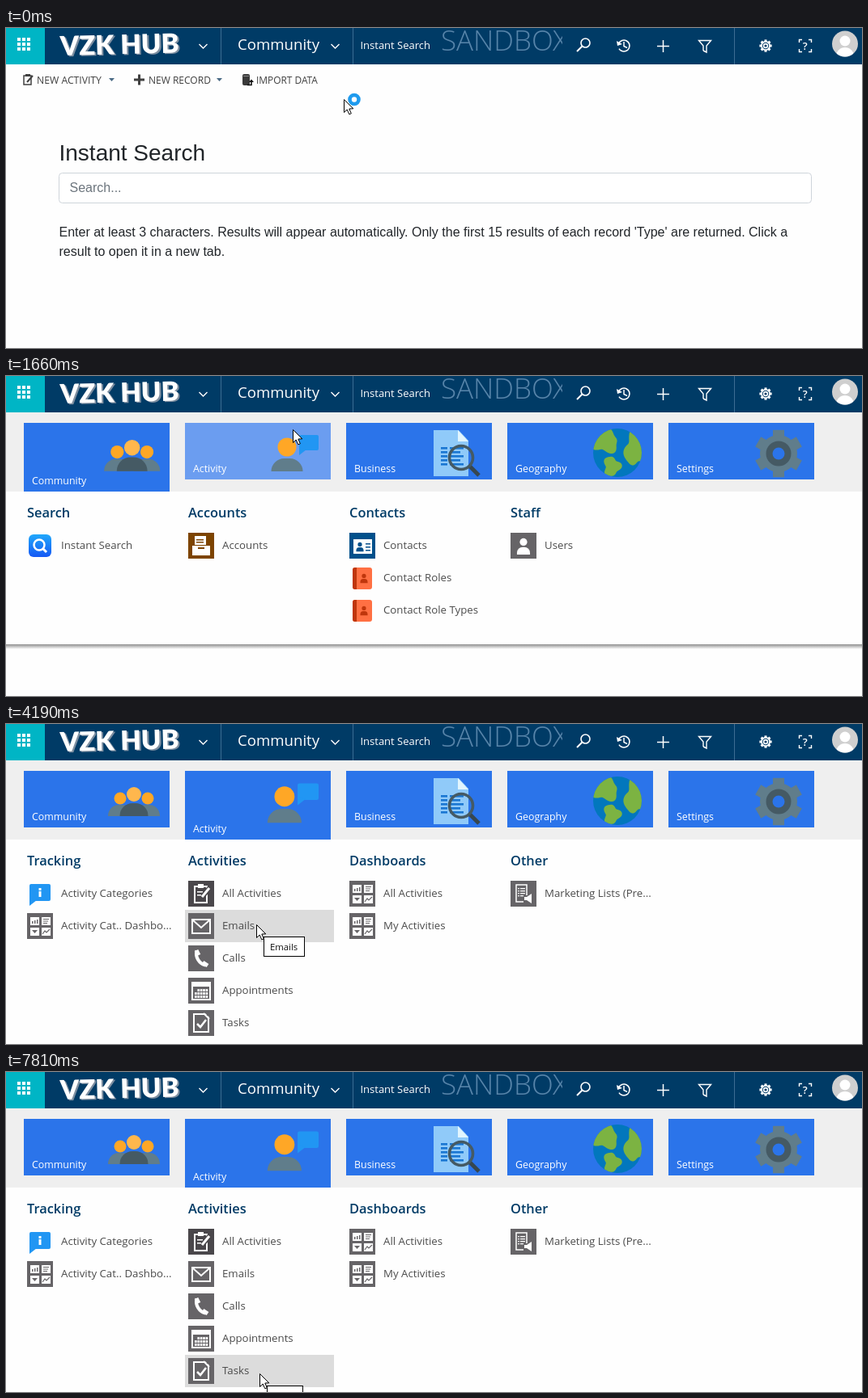
Recreate the animation shown at these times as an HTML page with a canvas. Size 1057x396 px, loop 8.46 s.

```html
<!DOCTYPE html>
<html lang="en">
<head>
<meta charset="utf-8">
<title>Navigation menu</title>
<style>
html, body { margin: 0; width: 100%; height: 100%; overflow: hidden; background: #fefefe; }
canvas { display: block; width: 1057px; height: 396px; }
</style>
</head>
<body>
<canvas id="stage"></canvas>
<script>
const W = 1057, H = 396, LOOP = 8460, TICK = 110;
const COL = 199, ROW = 40, LIST_TOP = 190;
const OPEN = 6, CLICK = 20, DWELL = 4; // in ticks
const NAVY = '#003b66', BLUE = '#2b74ea', GREY = '#666467', PAGE = '#fefefe', INK = '#404040';
const UI = '"Open Sans", "Noto Sans", sans-serif';
const ARIAL = '"Liberation Sans", Arial, sans-serif';
const canvas = document.getElementById('stage');
const dpr = window.devicePixelRatio || 1;
canvas.width = W * dpr;
canvas.height = H * dpr;
const g = canvas.getContext('2d', { alpha: false });

// Drawing helpers
const clamp = v => Math.min(1, Math.max(0, v));
const times = (n, f) => { for (let i = 0; i < n; i++) f(i); };
function rect(c, x, y, w, h) { g.fillStyle = c; g.fillRect(x, y, w, h); }
function frame(c, t, x, y, w, h) { g.strokeStyle = c; g.lineWidth = t; g.strokeRect(x, y, w, h); }
function round(c, x, y, w, h, r) { g.fillStyle = c; g.beginPath(); g.roundRect(x, y, w, h, r); g.fill(); }
function circle(c, x, y, r) { g.fillStyle = c; g.beginPath(); g.arc(x, y, r, 0, 7); g.fill(); }
function arc(c, w, x, y, r, a = 0, b = Math.PI * 2) {
  g.strokeStyle = c; g.lineWidth = w; g.beginPath(); g.arc(x, y, r, a, b); g.stroke();
}
function trace(p) {
  g.beginPath();
  for (let i = 0; i < p.length; i += 2) g.lineTo(p[i], p[i + 1]);
}
function poly(c, ...p) { trace(p); g.fillStyle = c; g.fill(); }
function line(c, w, ...p) { trace(p); g.strokeStyle = c; g.lineWidth = w; g.stroke(); }
function caret(c, x, y, s) { poly(c, x - s, y, x + s, y, x, y + s * 1.15); }
function text(s, x, y, size, c, weight = 400, family = UI) {
  g.font = `${weight} ${size}px ${family}`; g.fillStyle = c; g.fillText(s, x, y);
}
function at(x, y, k, draw) { g.save(); g.translate(x, y); g.scale(k, k); draw(); g.restore(); }
function gear(c, r, teeth, tooth) {
  circle(c, 0, 0, r);
  times(teeth, i => {
    g.save(); g.rotate(i * Math.PI * 2 / teeth);
    rect(c, -tooth / 2, -r * 1.27, tooth, r * .6);
    g.restore();
  });
}
function person(c, x, y, k) {
  at(x, y, k, () => {
    circle(c, 0, -4, 4);
    round(c, -7, 1.5, 14, 8, [6, 6, 0, 0]);
  });
}
function bust(head, body, x, y, r, w, h, base) {
  circle(head, x, y, r);
  round(body, x - w / 2, base - h, w, h, [w * .45, w * .45, 0, 0]);
}
// Wavy patch of land
function land(x, y, r, tall) {
  g.beginPath();
  for (let a = 0; a < 6.3; a += .1) {
    const q = r * (1 + .18 * Math.sin(3 * a + x) + .1 * Math.sin(5 * a + y));
    g.lineTo(x + q * Math.cos(a), y + q * tall * Math.sin(a));
  }
  g.fillStyle = '#7cb342'; g.fill();
}

// Tile pictures, origin near the top right corner
function people() {
  for (const side of [-1, 1]) bust('#ffa726', '#607d8b', -29 + side * 17, 26, 7.5, 30, 14, 48);
  bust('#ffb74d', '#455a64', -29, 21, 9, 35, 16, 48);
}
function talker() {
  bust('#ffa726', '#607d8b', -39, 22, 11.5, 39, 16, 52);
  round('#2196f3', -24, 7, 24, 19, 2);
  poly('#2196f3', -24, 22, -24, 32, -15, 25);
}
function report() {
  rect('#90caf9', -57, 1, 43, 57);
  poly(BLUE, -27, 0, -14, 0, -14, 14);
  poly('#e1f5fe', -27, 1, -14, 15, -27, 15);
  times(5, i => {
    rect('#1976d2', -48, 22 + i * 5, 8, 2.6);
    rect('#1976d2', -37, 22 + i * 5, 17 - i % 2 * 4, 2.6);
  });
  line('#37474f', 5, -13, 45, -1, 57);
  arc('#455a64', 3.6, -23, 35, 14.5);
}
function globe() {
  g.save();
  g.beginPath(); g.arc(-29, 29, 30, 0, 7); g.clip();
  rect('#0277bd', -60, -2, 64, 64);
  land(-45, 15, 17, .8);
  land(-36, 46, 10, 1.2);
  land(-6, 24, 14, 1.5);
  g.restore();
}
function cog() {
  at(-29, 30, 1, () => {
    gear('#607d8b', 23, 6, 14);
    circle('#455a64', 0, 0, 15.5);
    circle(BLUE, 0, 0, 7.5);
  });
}
const TILES = [['Community', people], ['Activity', talker], ['Business', report], ['Geography', globe], ['Settings', cog]];

// List icons in a 32 px box
const box = (c, draw) => () => { rect(c, 0, 0, 32, 32); draw(); };
const lens = () => {
  const f = g.createLinearGradient(0, 2, 0, 30);
  f.addColorStop(0, '#20a8fb'); f.addColorStop(1, '#1658f4');
  round(f, 2, 2, 28, 28, 6);
  arc('#fff', 2.5, 15, 15, 6.5);
  line('#fff', 3, 20, 20, 24, 24);
};
const folder = box('#7d4400', () => {
  rect('#fff', 8, 4, 14, 11);
  times(2, i => rect('#7d4400', 10, 8 + i * 3, 9, 1.5));
  rect('#fff', 5, 16, 22, 12);
  rect('#7d4400', 12, 18, 8, 2);
});
const card = box('#00508b', () => {
  rect('#fff', 5, 8, 23, 18);
  person('#00508b', 13, 17, .65);
  times(3, i => rect('#00508b', 20, 13 + i * 4, 6, 1.5));
});
const book = () => {
  round('#ff7043', 4, 3, 24, 27, 3);
  round('#bf360c', 4, 3, 5, 27, [3, 0, 0, 3]);
  person('#bf360c', 18, 16, .65);
};
const user = box(GREY, () => person('#fff', 16, 16, 1.15));
const info = () => {
  round('#2196f3', 3, 4, 26, 21, 2);
  poly('#2196f3', 3, 22, 3, 31, 12, 24);
  rect('#fff', 14.5, 9, 3, 3);
  rect('#fff', 14.5, 13, 3, 7);
};
const dash = box(GREY, () => {
  for (const x of [4, 18]) for (const y of [5, 18]) rect('#fff', x, y, 11, 10);
  times(3, i => {
    rect(GREY, 6 + i * 3, 10 - i, 1.5, 3 + i);
    rect(GREY, 20, 7 + i * 2.5, 7 - i, 1);
  });
  caret(GREY, 9.5, 21, 3.5);
  line(GREY, 1.2, 19, 26, 22, 22, 24, 24, 28, 20);
});
const notes = box('#4a474b', () => {
  frame('#fff', 2, 8, 7, 15, 20);
  rect('#fff', 12, 4, 7, 5);
  times(2, i => rect('#fff', 11, 13 + i * 4, 7 - i * 2, 1.5));
  line('#4a474b', 6, 18, 19, 27, 8);
  line('#fff', 3, 17, 20, 26, 9);
});
const mail = box(GREY, () => {
  frame('#fff', 2, 5, 8, 22, 17);
  line('#fff', 2, 6, 9, 16, 18, 26, 9);
});
const phone = box(GREY, () => {
  arc('#fff', 4, 25, 10, 15, 1.8, 3.4);
  line('#fff', 5, 10, 6, 13, 12);
  line('#fff', 5, 18, 21, 24, 25);
});
const calendar = box(GREY, () => {
  frame('#fff', 2, 5, 6, 22, 21);
  rect('#fff', 5, 6, 22, 5);
  times(14, i => rect('#fff', 8 + (i + 1) % 5 * 3.4, 14 + Math.floor((i + 1) / 5) * 4, 2.6, 3));
});
const task = box(GREY, () => {
  frame('#fff', 2, 7, 5, 18, 22);
  poly(GREY, 20, 3, 27, 3, 27, 10);
  line('#fff', 2, 19, 4, 26, 11);
  line('#fff', 2.5, 11, 17, 15, 21, 22, 12);
});
const market = box(GREY, () => {
  frame('#fff', 1.5, 7, 5, 13, 21);
  times(4, i => { rect('#fff', 9, 9 + i * 3, 2, 1.3); rect('#fff', 12, 9 + i * 3, 6, 1.3); });
  rect(GREY, 16, 18, 10, 11);
  rect('#fff', 17, 20, 4, 4);
  poly('#fff', 20, 20, 26, 16, 26, 28, 20, 24);
});

const LISTS = [
  [['Search', [lens, 'Instant Search']], ['Accounts', [folder, 'Accounts']],
   ['Contacts', [card, 'Contacts'], [book, 'Contact Roles'], [book, 'Contact Role Types']],
   ['Staff', [user, 'Users']]],
  [['Tracking', [info, 'Activity Categories'], [dash, 'Activity Cat.. Dashbo...']],
   ['Activities', [notes, 'All Activities'], [mail, 'Emails'], [phone, 'Calls'], [calendar, 'Appointments'], [task, 'Tasks']],
   ['Dashboards', [dash, 'All Activities'], [dash, 'My Activities']],
   ['Other', [market, 'Marketing Lists (Pre...']]]
];

// Pointer moves; the pointer rests in between, then shows the tip
const MOVES = [
  { from: 0, to: 4, x: 409, y: 9 },
  { from: 4, to: 8, x: 418, y: 25 },
  { from: 8, to: 15, x: 354, y: 66 },
  { from: 15, to: 18, x: 341, y: 97, tip: 'Activity' },
  { from: 27, to: 34, x: 309, y: 248, tip: 'Emails' },
  { from: 40, to: 45, x: 332, y: 286, tip: 'Calls' },
  { from: 53, to: 55, x: 330, y: 324, tip: 'Appointments' },
  { from: 63, to: 67, x: 313, y: 373, tip: 'Tasks' }
];

function pointer(n) {
  let x = 417, y = 88, tip;
  for (const m of MOVES) {
    if (n <= m.from) break;
    const u = clamp((n - m.from) / (m.to - m.from)), e = u * u * (3 - 2 * u);
    x += (m.x - x) * e;
    y += (m.y - y) * e;
    const ready = m.y < LIST_TOP ? n > m.to && n <= CLICK : n >= m.to + DWELL;
    tip = ready ? m.tip : '';
  }
  return { x: Math.round(x), y: Math.round(y), tip };
}

function nav() {
  rect(NAVY, 0, 0, W, 45);
  rect('#00b5c5', 0, 0, 48, 45);
  times(9, i => rect('#fff', 14 + i % 3 * 6, 12 + Math.floor(i / 3) * 6, 4, 4));
  for (const x of [265, 428, 899]) rect('#3d6c92', x, 0, 1, 45);

  g.save();
  g.translate(67, 34); g.rotate(-.025);
  text('VZK HUB', 2, 1.5, 33, '#7d8ea0', 900, 'Lato, sans-serif');
  text('VZK HUB', 0, 0, 33, '#fff', 900, 'Lato, sans-serif');
  g.restore();

  for (const x of [243.5, 406.5]) line('#fff', 1.4, x - 5, 20, x, 25, x + 5, 20);
  text('Community', 286, 27, 18.6, '#fff');
  text('Instant Search', 437.5, 26, 13, '#fff');
  g.save();
  g.beginPath(); g.rect(530, 0, 157, 45); g.clip();
  text('SANDBOX', 537, 28, 35, '#5784a9', 300);
  g.restore();

  arc('#fff', 1.6, 715.5, 18.5, 5.5);
  line('#fff', 2, 711.5, 22.5, 705, 29);
  arc('#fff', 1.6, 763, 22, 7, -2.7, 2.6);
  poly('#fff', 754, 16, 755, 22, 761, 20);
  line('#fff', 1.5, 763, 17, 763, 22.5, 767, 24.5);
  line('#fff', 1.5, 804, 22.5, 819, 22.5);
  line('#fff', 1.5, 811.5, 15, 811.5, 30);
  at(863, 22, 1, () => line('#fff', 1.4, -2, 6, -2, 0, -7.5, -6.5, 7.5, -6.5, 2, 0, 2, 8, -2, 6));
  at(938, 22, 1, () => {
    gear('#fff', 6, 8, 3);
    circle(NAVY, 0, 0, 4.2);
    arc('#fff', 1.6, 0, 0, 2.4);
  });
  at(987, 22, 1, () => {
    for (const sx of [-1, 1]) for (const sy of [-1, 1])
      line('#fff', 1.4, sx * 4, sy * 7.5, sx * 7.5, sy * 7.5, sx * 7.5, sy * 4);
    text('?', -3.2, 5, 13, '#fff', 600);
  });

  g.save();
  g.beginPath(); g.arc(1036, 19.5, 16, 0, 7); g.clip();
  rect('#cfcfcf', 1019, 3, 34, 34);
  circle('#fff', 1036, 16, 6.5);
  circle('#fff', 1036, 35, 11);
  g.restore();
}

function searchPage() {
  frame(INK, 1.5, 22, 59, 9, 11);
  rect(INK, 24, 57, 6, 3);
  line(INK, 2, 26, 67, 33, 59);
  text('NEW ACTIVITY', 38, 69, 12.2, INK);
  caret('#4a6a85', 130.5, 62, 3.5);
  rect(INK, 158, 62.5, 13, 3);
  rect(INK, 163, 57.5, 3, 13);
  text('NEW RECORD', 176, 69, 12, INK);
  caret('#4a6a85', 263.5, 62, 3.5);
  round('#3a3a3a', 292, 57, 9, 14, 2);
  rect('#888', 293, 59, 7, 1);
  line('#111', 1.6, 298, 70.5, 303, 70.5, 303, 66);
  caret('#111', 303, 67, -3);
  text('IMPORT DATA', 309, 69, 11.9, INK);

  const body = '#212529';
  text('Instant Search', 65.5, 164, 28, body, 400, ARIAL);
  round('#fff', 65, 179, 930, 38, 4);
  g.beginPath(); g.roundRect(65.5, 179.5, 929, 37, 4);
  g.strokeStyle = '#ced4da'; g.lineWidth = 1; g.stroke();
  text('Search...', 78.5, 203, 16, '#6c757d', 400, ARIAL);
  text("Enter at least 3 characters. Results will appear automatically. Only the first 15 results of each record 'Type' are returned. Click a", 65.5, 258, 16, body, 400, ARIAL);
  text('result to open it in a new tab.', 65.5, 282, 16, body, 400, ARIAL);
}

function menu(n, mouse) {
  const swap = clamp((n - CLICK) / 4);
  const drop = Math.round(-100 * clamp((12 - n) / 8) ** 2);
  rect('#efefef', 0, 45, W, 98 + Math.round(drop * .4));

  TILES.forEach(([label, art], i) => {
    const grow = [1 - swap, swap][i] || 0;
    const x = 22 + i * COL, y = 58 + drop, h = 70 + Math.round(15 * grow);
    const over = !grow && mouse.x >= x && mouse.x < x + 180 && mouse.y >= y && mouse.y < y + h;
    rect(over ? '#6b9df0' : BLUE, x, y, 180, h);
    at(x + 165, y + 8, 1 + .08 * grow, art);
    text(label, x + 10, y + h - 9, 12.4, '#fff');
  });

  const edge = 332 + Math.round(swap * 90);
  if (n >= 10 && edge < H) {
    const f = g.createLinearGradient(0, edge, 0, edge + 6);
    f.addColorStop(0, '#8f8f8f'); f.addColorStop(1, PAGE);
    rect(f, 0, edge, W, 6);
  }

  const row = Math.floor((mouse.y - LIST_TOP) / ROW);
  if (swap && row >= 0) rect('#dcdcdc', 22 + COL, LIST_TOP + row * ROW, 184, ROW);
  g.globalAlpha = swap || 1;
  LISTS[swap ? 1 : 0].forEach(([title, ...rows], i) => {
    const x = 26 + i * COL;
    text(title, x, 175, 16.4, NAVY, 600);
    rows.forEach(([icon, label], r) => {
      const y = LIST_TOP + 4 + r * ROW;
      at(x, y, 1, icon);
      text(label, x + 42, y + 20, 13.25, '#4c4c4c');
    });
  });
  g.globalAlpha = 1;
}

function tooltip(label, x, y) {
  g.font = '400 11.3px ' + UI;
  const w = Math.round(g.measureText(label).width) + 17;
  rect('#000', x, y, w, 25);
  rect('#fff', x + 1, y + 1, w - 2, 23);
  text(label, x + 8, y + 17, 11.3, '#111');
}

function arrow(x, y, busy) {
  if (busy) arc('#1f9bee', 4.6, x + 13, y + .5, 5.5);
  at(x + .5, y + .5, 1, () => {
    poly('#fff', 0, 0, 0, 16, 3.7, 12.5, 6.3, 18.3, 8.8, 17.3, 6.3, 11.5, 11.3, 11.3);
    g.closePath();
    g.strokeStyle = '#000'; g.lineWidth = 1; g.stroke();
  });
}

function draw(ms) {
  const n = Math.floor((ms % LOOP + 5) / TICK);
  const mouse = pointer(n);
  g.setTransform(dpr, 0, 0, dpr, 0, 0);
  rect(PAGE, 0, 0, W, H);
  if (n < OPEN) searchPage(); else menu(n, mouse);
  nav();
  if (mouse.tip) tooltip(mouse.tip, mouse.x + 9, mouse.y + 15);
  arrow(mouse.x, mouse.y, n < 10);
}

const start = performance.now();
function loop() {
  draw(performance.now() - start);
  requestAnimationFrame(loop);
}
loop();
</script>
</body>
</html>
```
